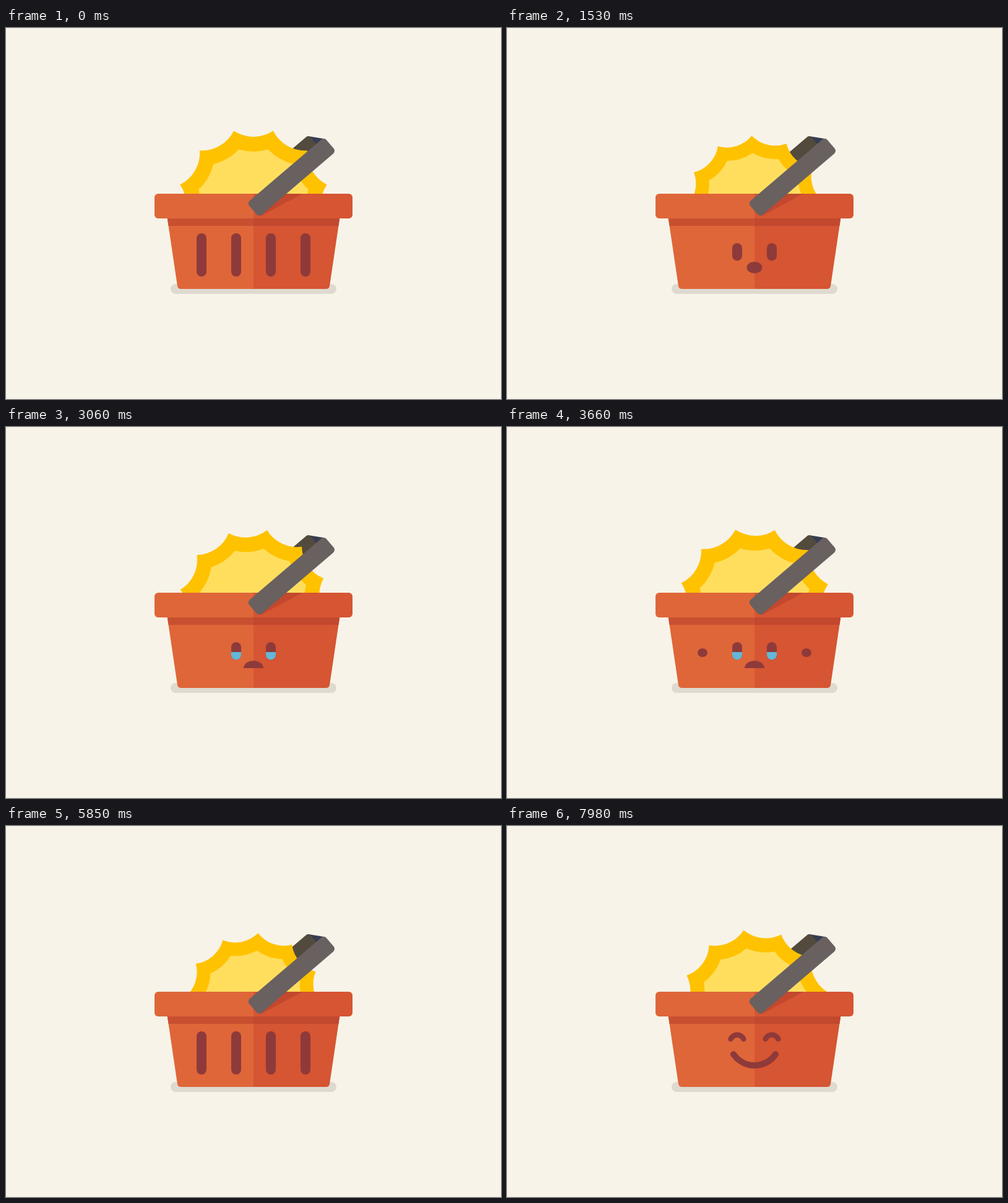
Recreate the animation shown at these times as an HTML page with a canvas. Size 800 by 600 pixels, loop 8000 ms.

```html
<!DOCTYPE html>
<html lang="en">
<head>
<meta charset="utf-8">
<title>Shopping basket</title>
<style>
  html, body { margin: 0; width: 100%; height: 100%; overflow: hidden; background: #f7f3e8; }
  canvas { display: block; width: 800px; height: 600px; }
</style>
</head>
<body>
<canvas id="stage" width="800" height="600"></canvas>
<script>
const ctx = document.getElementById('stage').getContext('2d');
const LOOP = 8000, STEP = 30, TAU = Math.PI * 2;
const HANDLE_ANGLE = 40.5 * Math.PI / 180;
const C = {
  bg: '#f7f3e8', shadow: '#dfdad0', sunRim: '#ffc200', sun: '#ffde5e',
  left: '#df6639', right: '#d65532', bandLeft: '#c85031', bandRight: '#c2482e',
  hole: '#8e3a3a', bar: '#696060', backBar: '#524b3d', hinge: '#363d52', tear: '#62b8d8'
};

const clamp = x => Math.min(1, Math.max(0, x));
const mix = (a, b, p) => a + (b - a) * p;
const ease = p => p < .5 ? 4 * p ** 3 : 1 - 4 * (1 - p) ** 3;
const span = (t, from, to) => clamp((t - from) / (to - from));
const move = (t, from, to) => ease(span(t, from, to));
// Rises over [a, b] and falls back over [c, d].
const hold = (t, a, b, c, d) => move(t, a, b) - move(t, c, d);

function fillRound(x, y, w, h, r, color) {
  ctx.beginPath();
  ctx.roundRect(x, y, w, h, r);
  ctx.fillStyle = color;
  ctx.fill();
}

function fillPoly(points, color) {
  ctx.beginPath();
  points.forEach(([x, y]) => ctx.lineTo(x, y));
  ctx.closePath();
  ctx.fillStyle = color;
  ctx.fill();
}

// Runs a drawing inside a clipping path.
function clipped(path, draw) {
  ctx.save();
  ctx.clip(path);
  draw();
  ctx.restore();
}

function halves(y, h, leftColor, rightColor) {
  ctx.fillStyle = leftColor;
  ctx.fillRect(230, y, 170, h);
  ctx.fillStyle = rightColor;
  ctx.fillRect(400, y, 170, h);
}

// Twelve-pointed star whose edges are bitten out by circles of radius r.
function scallop(r, color) {
  const dist = 167, a = Math.PI / 12;
  const tip = dist * Math.cos(a) - Math.sqrt(r * r - (dist * Math.sin(a)) ** 2);
  const half = Math.asin(tip * Math.sin(a) / r);
  ctx.beginPath();
  for (let i = 0; i < 12; i++) {
    const dir = i * TAU / 12 + a;
    ctx.arc(dist * Math.cos(dir), dist * Math.sin(dir), r,
      dir + Math.PI + half, dir + Math.PI - half, true);
  }
  ctx.closePath();
  ctx.fillStyle = color;
  ctx.fill();
}

function drawSun(t) {
  const scale = (116.35 + 6.35 * Math.cos(TAU * t / 3600)) / 122.8;
  ctx.save();
  ctx.translate(400, 285);
  ctx.rotate((15 + t / 120) * Math.PI / 180);
  ctx.scale(scale, scale);
  scallop(57.8, C.sunRim);
  scallop(81.8, C.sun);
  ctx.restore();
}

function drawBar(x, y, w, r, color) {
  ctx.save();
  ctx.rotate(-HANDLE_ANGLE);
  fillRound(x, y, w, 29.8, r, color);
  ctx.restore();
}

function drawBackHandle() {
  fillPoly([[488.5, 174.9], [515, 179.2], [503, 190], [492, 184]], C.hinge);
  drawBar(150, 449, 109.5, 5, C.backBar);
}

const body = new Path2D();
body.moveTo(260.5, 306);
body.lineTo(539.5, 306);
body.arcTo(522.3, 422, 400, 422, 6);
body.arcTo(277.7, 422, 260.5, 306, 6);
body.closePath();

const rim = new Path2D();
rim.roundRect(240, 268, 320, 40, 6);

function drawBasket() {
  clipped(body, () => {
    halves(300, 130, C.left, C.right);
    halves(300, 20, C.bandLeft, C.bandRight);
  });
  clipped(rim, () => halves(268, 40, C.left, C.right));
  fillPoly([[440, 268], [479, 268], [412, 304], [404, 298]], C.bandRight);
}

function drawPill(x, top, bottom, color = C.hole) {
  const h = bottom - top;
  if (h < .3) return;
  const ry = Math.min(8, h / 2);
  ctx.beginPath();
  ctx.ellipse(x, top + ry, 8, ry, 0, Math.PI, TAU);
  ctx.ellipse(x, bottom - ry, 8, ry, 0, 0, Math.PI);
  ctx.closePath();
  ctx.fillStyle = color;
  ctx.fill();
}

function drawOuterSlots(p) {
  const mid = 367 - 2.5 * p, half = 35 * (1 - p);
  for (const x of [316, 484]) drawPill(x, mid - half, mid + half);
}

// Round, surprised mouth that sinks into a flat-bottomed frown.
function drawMouth(size, sad) {
  if (size <= 0) return;
  const y = mix(387.4, 390, sad);
  ctx.save();
  ctx.translate(400, y);
  ctx.scale(size, size);
  ctx.beginPath();
  ctx.ellipse(0, 0, mix(12.5, 16, sad), mix(9.4, 12, sad), 0, Math.PI, TAU);
  ctx.ellipse(0, 0, mix(12.5, 16, sad), mix(9.4, 0, sad), 0, 0, Math.PI);
  ctx.closePath();
  ctx.fillStyle = C.hole;
  ctx.fill();
  ctx.restore();
}

function drawTears(x, top, bottom, fill, dropStart, t) {
  if (fill <= 0) return;
  const level = mix(bottom, 364, fill);
  const area = new Path2D();
  area.rect(x - 10, level, 20, 120);
  clipped(area, () => {
    drawPill(x, top, bottom, C.tear);
    const p = span(t, dropStart, dropStart + 570);
    if (p > 0 && p < 1) {
      ctx.globalAlpha = 1 - span(p, .85, 1);
      ctx.beginPath();
      ctx.ellipse(x, 368 + 71 * p * p, 7, 8, 0, 0, TAU);
      ctx.fillStyle = C.tear;
      ctx.fill();
    }
  });
}

// Arc stroke that grows outwards from its middle.
function drawCurve(x, y, r, middle, spread, width, grow) {
  if (grow <= 0) return;
  ctx.beginPath();
  ctx.arc(x, y, r, middle - spread * grow, middle + spread * grow);
  ctx.lineWidth = width * Math.min(1, grow * 3);
  ctx.lineCap = 'round';
  ctx.strokeStyle = C.hole;
  ctx.stroke();
}

function drawSadFace(t) {
  const outer = hold(t, 500, 900, 3505, 3925);
  const eye = hold(t, 820, 1200, 3900, 4320);
  const top = mix(332, 348, eye), bottom = mix(402, 376.4, eye);
  const fill = hold(t, 1650, 1830, 3690, 3870);
  drawOuterSlots(outer);
  for (const x of [372, 428]) {
    drawPill(x, top, bottom);
    drawTears(x, top, bottom, fill, x < 400 ? 1800 : 2400, t);
  }
  drawMouth(hold(t, 1200, 1440, 3690, 3900), move(t, 1580, 1860));
}

function drawHappyFace(t) {
  const eye = move(t, 7310, 7620), arc = move(t, 7590, 7860);
  drawOuterSlots(move(t, 7050, 7380));
  for (const x of [372, 428]) {
    if (arc <= 0) drawPill(x, mix(332, 334, eye), mix(402, 342, eye));
    drawCurve(x, 349.2, 11.4, -Math.PI / 2, 1.14, 8.6, arc);
  }
  drawCurve(400, 346.2, 41, Math.PI / 2, .978, 10, move(t, 7530, 7890));
}

function draw(t) {
  ctx.fillStyle = C.bg;
  ctx.fillRect(0, 0, 800, 600);
  fillRound(266, 414, 268, 16, 8, C.shadow);
  drawBackHandle();
  drawSun(t);
  drawBasket();
  (t < 6000 ? drawSadFace : drawHappyFace)(t);
  drawBar(112.2, 468.2, 164, 6, C.bar);
}

const start = performance.now();
function tick() {
  const t = (performance.now() - start) % LOOP;
  draw(Math.floor(t / STEP) * STEP);
  requestAnimationFrame(tick);
}
tick();
</script>
</body>
</html>
```
